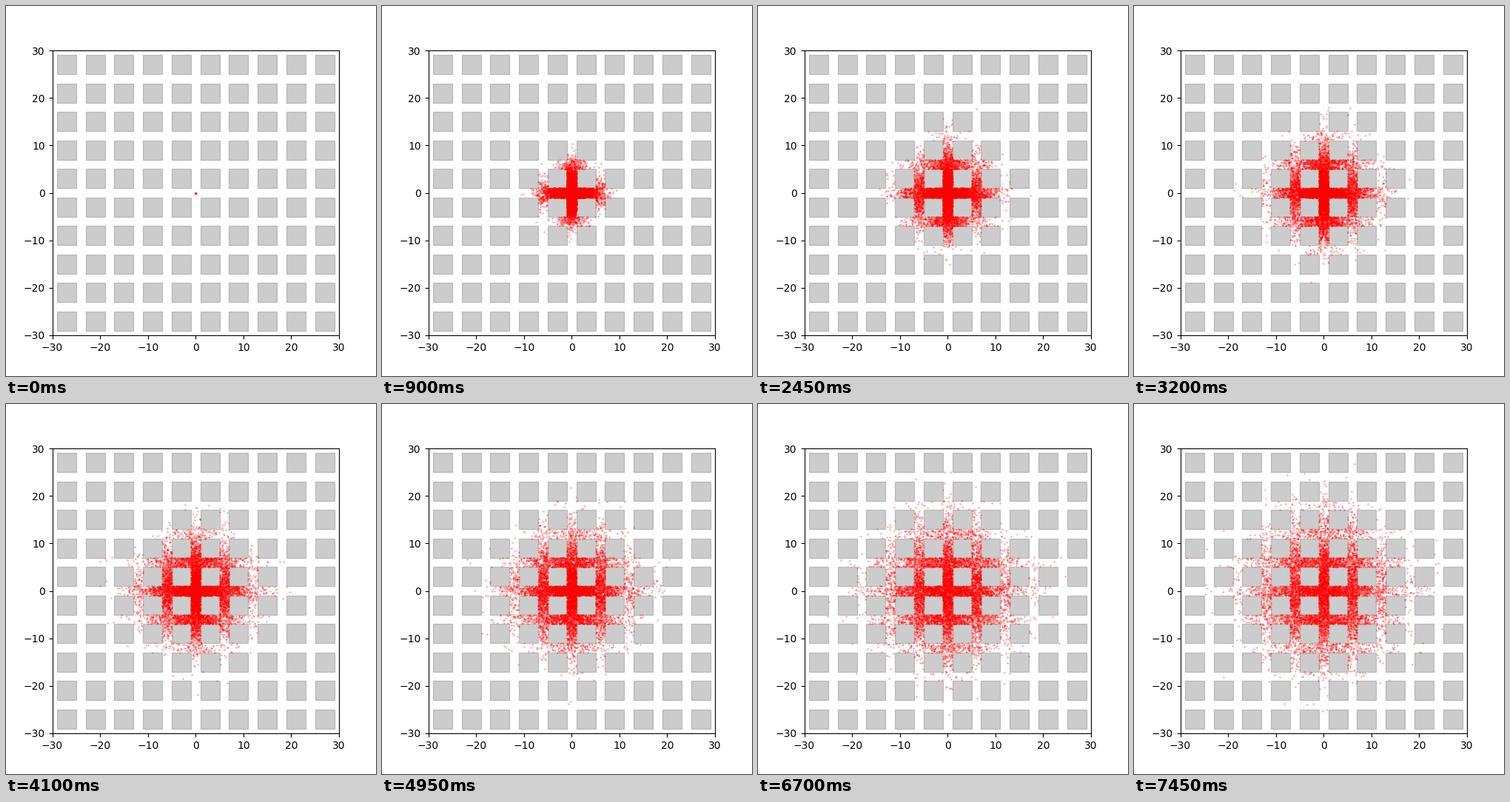
Recreate the animation shown at these times as a matplotlib script. Size 500 px wide and 500 px high, loop 7500 ms.

```python
import numpy as np
import matplotlib.pyplot as plt
from matplotlib.animation import FuncAnimation
from matplotlib.patches import Rectangle

FRAMES, INTERVAL = 150, 50
WALKERS = 10000
LIMIT, PITCH, BLOCK = 30, 6, 4
GAP = (PITCH - BLOCK) / 2


def blocked(pos):
    """True where a point lies inside a city block."""
    cell = pos % PITCH
    inside = (cell > GAP) & (cell < PITCH - GAP)
    return inside.all(axis=1)


def walk(seed=3):
    """Unit steps in random directions; steps into a block are dropped."""
    rng = np.random.default_rng(seed)
    pos = np.zeros((WALKERS, 2))
    path = [pos]
    for _ in range(FRAMES - 1):
        angle = rng.uniform(0, 2 * np.pi, WALKERS)
        trial = pos + np.column_stack((np.cos(angle), np.sin(angle)))
        pos = np.where(blocked(trial)[:, None], pos, trial)
        path.append(pos)
    return path


path = walk()

fig, ax = plt.subplots(figsize=(5, 5), dpi=100)
ax.set_xlim(-LIMIT, LIMIT)
ax.set_ylim(-LIMIT, LIMIT)

corners = np.arange(-LIMIT, LIMIT, PITCH) + GAP
for x in corners:
    for y in corners:
        ax.add_patch(Rectangle((x, y), BLOCK, BLOCK, color="gray", alpha=0.4))

dots, = ax.plot([], [], "r.", markersize=0.5)


def update(i):
    dots.set_data(path[i][:, 0], path[i][:, 1])
    return dots,


anim = FuncAnimation(fig, update, frames=FRAMES, interval=INTERVAL,
                     init_func=lambda: update(0), repeat=True)
plt.show()
```
